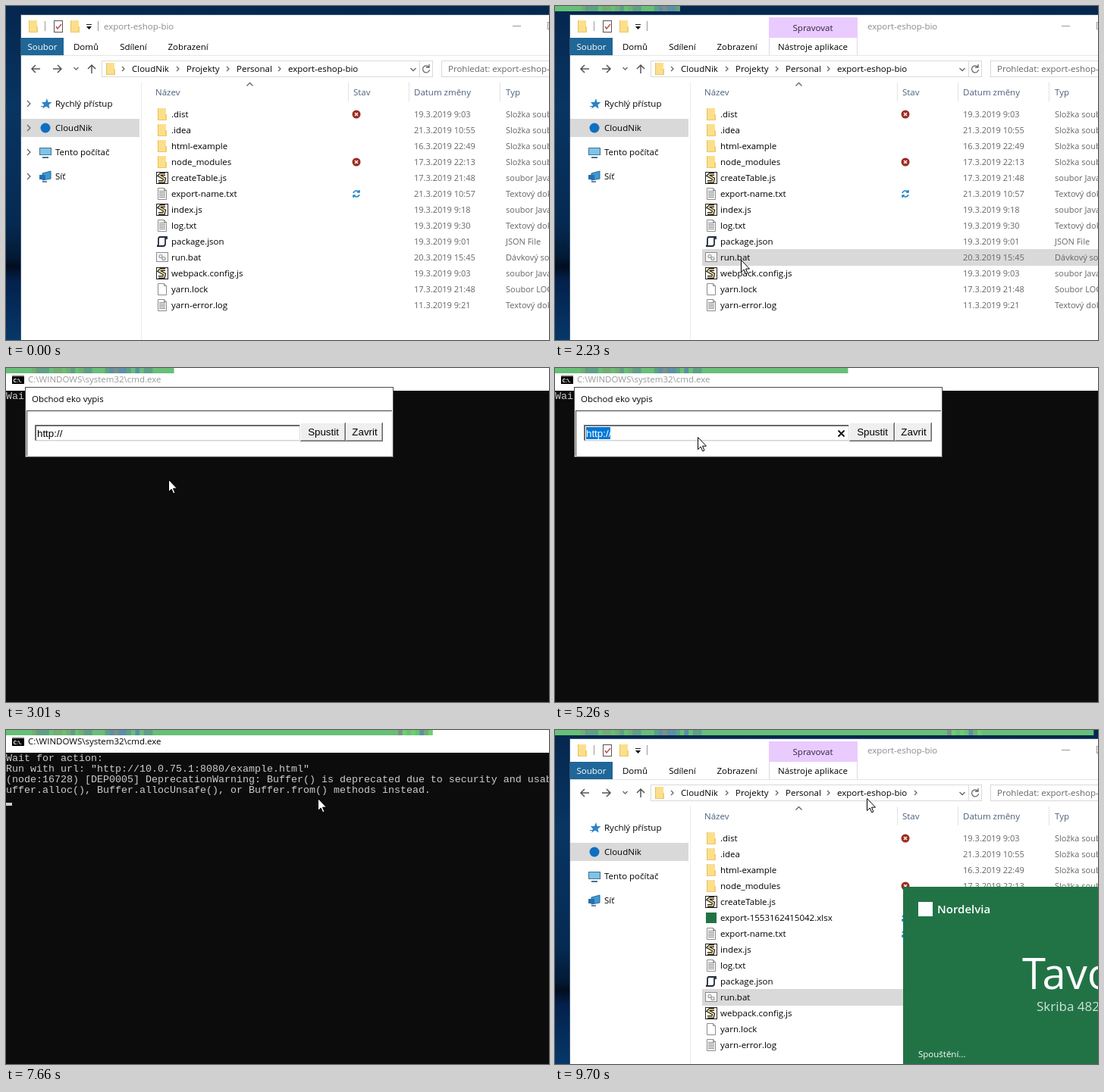
These frames come from a looping animation (716 by 441 pixels, 9.79 s). An HTML page:

```html
<!DOCTYPE html>
<html lang="cs">
<head>
<meta charset="utf-8">
<title>Export</title>
<style>
html, body { margin: 0; width: 100%; height: 100%; overflow: hidden; background: #0c0c0c; }
svg { display: block; }
text { font-family: "Open Sans", "Noto Sans", sans-serif; font-size: 11.5px; white-space: pre; }
.mono { font: 13.33px "Liberation Mono", monospace; fill: #ccc; }
.form { font: 13.33px "Liberation Sans", sans-serif; }
.mid { text-anchor: middle; }
.grey { fill: #666; }
.cell { fill: #666; font-size: 11px; }
.head { fill: #4c607a; }
.line { fill: none; stroke: #666; stroke-width: 1.3; }
</style>
</head>
<body>
<svg id="stage" width="716" height="441" viewBox="0 0 716 441"></svg>
<script>
const LOOP = 9790, FRAMES = 126, STEP = 77.6, ROW = 21, FIRST = 143;

const rect = (x, y, w, h, fill, more = '') =>
  `<rect x="${x}" y="${y}" width="${w}" height="${h}" fill="${fill}" ${more}/>`;
const path = (d, more = 'class="line"') => `<path d="${d}" ${more}/>`;
const text = (x, y, s, cls = '', more = '') => `<text x="${x}" y="${y}" class="${cls}" ${more}>${s}</text>`;
const group = (id, body, more = '') => `<g id="${id}" ${more}>${body}</g>`;
const chevron = (x, y, size = 3) => path(`M${x} ${y - size}l${size} ${size}l${-size} ${size}`);

// Icons: x is the left edge, y the vertical centre.
const icons = {
  folder: (x, y) => rect(x + 2, y - 8, 11, 16, '#fbdf8c') + rect(x + 12, y, 2, 8, '#f3cf6c') +
    rect(x + 2, y - 8, 1, 16, '#e9c25c') + rect(x + 3, y + 7, 10, 1, '#eec965'),
  page: (x, y) => path(`M${x + 2.5} ${y - 7.5}h8l3 3v12h-11z`, 'fill="#fff" stroke="#8b8b8b"') +
    path(`M${x + 10.5} ${y - 7.5}v3h3`, 'fill="none" stroke="#8b8b8b"'),
  note: (x, y) => icons.page(x, y) +
    path([-4, -2, 0, 2, 4].map(d => `M${x + 4} ${y + d + .5}h8`).join(''), 'stroke="#8b8b8b"'),
  script: (x, y) => {
    const scroll = `M${x + 12} ${y - 5}h-6l-2 2l7 4l-1 4h-7`;
    return rect(x + .5, y - 7.5, 15, 15, '#fff', 'stroke="#222"') +
      path(scroll, 'fill="none" stroke="#222" stroke-width="4"') +
      path(scroll, 'fill="none" stroke="#f3dc96" stroke-width="1.7"');
  },
  json: (x, y) => path(`M${x + 14} ${y - 3}v-3h-9q-2 0-2 3v6q0 3-2 3h8q3 0 3-3v-9`,
    'fill="#fff" stroke="#222c3c" stroke-width="1.8"'),
  batch: (x, y) => rect(x + .5, y - 6.5, 15, 12, '#f7f7f7', 'stroke="#8a8a8a"') +
    `<g fill="none" stroke="#999" stroke-width="1.2"><circle cx="${x + 6}" cy="${y - 1.5}" r="2"/>` +
    `<circle cx="${x + 10}" cy="${y + 1.5}" r="2"/></g>`,
  sheet: (x, y) => rect(x + 1, y - 7, 14, 14, '#217346'),
  failed: (x, y) => `<circle cx="${x}" cy="${y}" r="5.5" fill="#9c2b20"/>` +
    path(`M${x - 2} ${y - 2}l4 4m0-4l-4 4`, 'stroke="#fff" stroke-width="1.4"'),
  sync: (x, y) => path(`M${x - 4} ${y - 1}q1-3 4-3t4 2m0-3v3h-3M${x + 4} ${y + 1}q-1 3-4 3t-4-2m0 3v-3h3`,
    'fill="none" stroke="#1c86c8" stroke-width="1.5"'),
};

const FILES = [
  ['folder', '.dist', '19.3.2019 9:03', 'Složka souborů', 'failed'],
  ['folder', '.idea', '21.3.2019 10:55', 'Složka souborů'],
  ['folder', 'html-example', '16.3.2019 22:49', 'Složka souborů'],
  ['folder', 'node_modules', '17.3.2019 22:13', 'Složka souborů', 'failed'],
  ['script', 'createTable.js', '17.3.2019 21:48', 'soubor JavaScript'],
  ['note', 'export-name.txt', '21.3.2019 10:57', 'Textový dokument', 'sync'],
  ['script', 'index.js', '19.3.2019 9:18', 'soubor JavaScript'],
  ['note', 'log.txt', '19.3.2019 9:30', 'Textový dokument'],
  ['json', 'package.json', '19.3.2019 9:01', 'JSON File'],
  ['batch', 'run.bat', '20.3.2019 15:45', 'Dávkový soubor'],
  ['script', 'webpack.config.js', '19.3.2019 9:03', 'soubor JavaScript'],
  ['page', 'yarn.lock', '17.3.2019 21:48', 'Soubor LOCK'],
  ['note', 'yarn-error.log', '11.3.2019 9:21', 'Textový dokument'],
];
const SHEET = ['sheet', 'export-1553162415042.xlsx', '21.3.2019 10:57', 'List sešitu', 'sync'];
const SPLIT = 5, BATCH = 9;

const rowY = i => FIRST + i * ROW;
const rowBox = (id, i) => rect(194, rowY(i) - 11, 522, ROW + 1, '#e5f3ff', `id="${id}"`);
function row([icon, name, date, type, state], i) {
  const y = rowY(i);
  return icons[icon](198, y) + text(218, y + 4, name) + (state ? icons[state](462, y) : '') +
    text(538, y + 4, date, 'cell') + text(659, y + 4, type, 'cell');
}

function desktop() {
  const stops = [[0, '#05264e'], [.3, '#083562'], [.65, '#052a52'], [.75, '#031a36'], [.78, '#020d1e'],
    [.82, '#03204a'], [1, '#06386a']];
  return `<linearGradient id="sky" x2="0" y2="1">` +
    stops.map(([o, c]) => `<stop offset="${o}" stop-color="${c}"/>`).join('') + '</linearGradient>' +
    rect(0, 0, 716, 441, 'url(#sky)');
}

function toolbar() {
  return rect(19.5, 11.5, 700, 433, '#fff', 'stroke="#3b5876"') + icons.folder(28, 27) + icons.folder(83, 27) +
    path('M51.5 20v13M121.5 20v13', 'stroke="#999"') +
    rect(63.5, 19.5, 11, 15, '#fff', 'stroke="#555"') +
    path('M66 27l2 3l5-6', 'fill="none" stroke="#c0504d" stroke-width="1.5"') +
    path('M106 24.5h7', 'stroke="#222"') + path('M106 27h7l-3.5 4z', '') +
    path('M668 26.5h11', 'stroke="#999"') + rect(714.5, 21.5, 9, 9, 'none', 'stroke="#999"') +
    path('M20 65.5h696', 'stroke="#e4e5e6"') +
    group('tab', rect(282, 15, 117, 27, '#e9cbff') +
      path('M282.5 42v23M398.5 42v23', 'stroke="#e0d6e8"') +
      text(340, 33, 'Spravovat', 'mid', 'fill="#33203f"') + text(340, 58, 'Nástroje aplikace', 'mid')) +
    text(129, 31, 'export-eshop-bio', '', 'id="caption" fill="#8c8c8c"') +
    rect(20, 42, 56, 23, '#1f6798') + text(48, 58, 'Soubor', 'mid', 'fill="#fff"') +
    text(105.5, 58, 'Domů', 'mid') + text(168, 58, 'Sdílení', 'mid') + text(240, 58, 'Zobrazení', 'mid');
}

function addressBar() {
  const crumbs = [[166, 'CloudNik'], [238, 'Projekty'], [304, 'Personal'], [372, 'export-eshop-bio']];
  return path('M45 83h-11m5-5l-5 5l5 5M62 83h11m-5-5l5 5l-5 5M113 89v-11m-5 5l5-5l5 5',
      'fill="none" stroke="#555" stroke-width="1.5"') + path('M89.5 81l3 3l3-3') +
    rect(126.5, 72.5, 436, 21, '#fff', 'stroke="#d9d9d9"') + icons.folder(130, 83) +
    crumbs.map(([x, s]) => chevron(x - 13, 83) + text(x, 87, s)).join('') +
    group('lastChevron', chevron(474, 83)) +
    path('M533.5 82l3.5 3.5l3.5-3.5') + path('M545.5 73v20', 'stroke="#d9d9d9"') +
    path('M557.5 80.5a4.5 4.5 0 1 0 1 3.5M558 77v4h-4') +
    rect(574.5, 72.5, 160, 21, '#fff', 'stroke="#d9d9d9"') +
    text(583, 87, 'Prohledat: export-eshop-bio', 'grey');
}

function navigation() {
  const labels = ['Rychlý přístup', 'CloudNik', 'Tento počítač', 'Síť'];
  const ys = labels.map((_, i) => 129 + 32 * i);
  return path('M178.5 100v341', 'stroke="#ececec"') + rect(20, 149, 156, 24, '#d9d9d9') +
    labels.map((s, i) => text(65, ys[i] + 4, s)).join('') +
    group('chevrons', ys.map(y => chevron(28, y, 4)).join('')) +
    path('M54 122l1.500 5h5l-4 3.500l1 5l-4.500-3l-5 3l2-5l-3-3.500h5z', 'fill="#2c83c7"') +
    path('M46 132.5h4', 'stroke="#2c83c7"') +
    '<circle cx="52" cy="161" r="6.5" fill="#0f6fc0"/>' +
    rect(44.5, 187.5, 15, 9, '#7cc4ea', 'stroke="#46718c"') + rect(48, 199, 8, 2, '#46718c') +
    path('M48 221l11-3v10l-11 2z', 'fill="#3e9ad6" stroke="#28678f"') +
    rect(44, 223, 8, 6, '#276fae') + rect(48, 231, 6, 2, '#66879b');
}

function fileList() {
  return path('M451.5 101v25M531.5 101v25M651.5 101v25', 'stroke="#e3e3e3"') +
    path('M317.5 105.5l4-4l4 4') +
    [[197, 'Název'], [458, 'Stav'], [538, 'Datum změny'], [659, 'Typ']].map(([x, s]) => text(x, 118, s, 'head')).join('') +
    rowBox('hover', 0) +
    FILES.slice(0, SPLIT).map(row).join('') + group('sheetRow', row(SHEET, SPLIT)) +
    group('tail', rowBox('chosen', BATCH) + FILES.slice(SPLIT).map((f, i) => row(f, i + SPLIT)).join(''));
}

function splash() {
  return rect(459, 207, 257, 234, '#217346') + rect(479, 227, 19, 19, '#fff') +
    text(504, 242, 'Nordelvia', '', 'fill="#fff" style="font-size:15px;font-weight:600"') +
    group('product', text(616, 342, 'Tavol', '', 'fill="#fff" style="font-size:56px"') +
      text(635, 371, 'Skriba 482', '', 'fill="#d3e3da" style="font-size:17px"')) +
    text(479, 432, 'Spouštění...', '', 'fill="#fff"');
}

function terminal() {
  const lines = ['Wait for action:', 'Run with url: "http://10.0.75.1:8080/example.html"',
    '(node:16728) [DEP0005] DeprecationWarning: Buffer() is deprecated due to security and usability',
    'uffer.alloc(), Buffer.allocUnsafe(), or Buffer.from() methods instead.'];
  return rect(0, 0, 716, 441, '#0c0c0c') + rect(0, 0, 716, 30, '#fff') +
    rect(8, 9, 16, 12, '#000') + rect(8, 9, 16, 2, '#b5b5b5') +
    text(9.5, 18.5, 'C:\\.', '', 'fill="#fff" style="font-size:7px;font-weight:700"') +
    text(29, 19, 'C:\\WINDOWS\\system32\\cmd.exe', '', 'id="cmdTitle"') +
    lines.map((s, i) => text(0, 41 + 14 * i, s, 'mono', `id="out${i}"`)).join('') +
    rect(0, 96, 8, 4, '#ccc', 'id="block"');
}

function button(x, w, label) {
  return rect(x, 72, w, 25, '#696969') + rect(x, 72, w - 1, 24, '#fff') +
    rect(x + 1, 73, w - 2, 23, '#a0a0a0') + rect(x + 1, 73, w - 3, 22, '#efefef') +
    text(x + w / 2 + .5, 89, label, 'form mid');
}

function dialog() {
  return rect(25.5, 25.5, 485, 92, '#fff', 'stroke="#4a4a4a"') + text(34, 45, 'Obchod eko vypis') +
    path('M27.5 116v-59.5h481.5', 'fill="none" stroke="#696969" stroke-width="1.5"') +
    path('M28 116.5h481v-58', 'fill="none" stroke="#dedede"') +
    rect(38, 75, 350, 21.5, '#dcdcdc') + rect(38, 75, 349, 20.5, '#696969') + rect(40, 77, 347, 18.5, '#fff') +
    rect(41, 78, 32, 16, '#0078d7', 'id="selection"') + text(41, 91, 'http://', 'form', 'id="url"') +
    path('M373.5 82.5l8 8m0-8l-8 8', 'id="clear" stroke="#111" stroke-width="1.8"') +
    button(388, 60, 'Spustit') + button(448, 49, 'Zavrit');
}

// Two busy stretches of the progress strip are speckled with muted tones.
function progress() {
  const tones = ['#67bf78', '#67bf78', '#5f9f86', '#7f8f86', '#5b8fa6', '#6dcf6c', '#74ad72'];
  const width = 716 / FRAMES;
  let s = rect(0, 0, 716, 7, '#67bf78');
  for (let i = 5; i < 99; i++) {
    if (i > 33 && i < 90) continue;
    const tone = tones[Math.floor(Math.abs(Math.sin(i * 12.9898) * 43758.5) % tones.length)];
    s += rect(i * width, 0, width + .2, 7, tone);
  }
  return `<clipPath id="done">${rect(0, 0, 0, 7, '#000', 'id="bar"')}</clipPath>` +
    `<g clip-path="url(#done)">${s}</g>`;
}

document.getElementById('stage').innerHTML =
  group('explorer', desktop() + toolbar() + addressBar() + navigation() + fileList() + group('splash', splash())) +
  group('terminal', terminal() + group('dialog', dialog())) +
  progress() +
  group('pointer', path('M.5 .5v16l3.7-3.5l2.5 5.8l2.3-1l-2.500-5.700h5z', 'fill="#fff" stroke="#000"'));

const $ = Object.fromEntries([...document.querySelectorAll('[id]')].map(e => [e.id, e]));
const show = (e, on) => e.setAttribute('visibility', on ? 'inherit' : 'hidden');
const ramp = (t, from, to) => Math.min(1, Math.max(0, (t - from) / (to - from)));
const ease = p => p * p * (3 - 2 * p);

// Pointer stops: time, x, y.
const STOPS = [[70, -14, 215], [680, 313, 252], [1050, 313, 252], [1700, 245, 335], [2300, 245, 335],
  [2950, 214, 147], [3080, 214, 147], [3450, 62, 84], [3620, 62, 84], [3960, 188, 91], [6120, 188, 91],
  [6640, 411, 90], [LOOP, 411, 90]];
function pointerAt(t) {
  const n = Math.max(1, STOPS.findIndex(s => s[0] >= t));
  const [a, b] = [STOPS[n - 1], STOPS[n]];
  const p = ease(ramp(t, a[0], b[0]));
  return [a[1] + (b[1] - a[1]) * p, a[2] + (b[2] - a[2]) * p].map(Math.round);
}

function render(time) {
  const frame = Math.min(FRAMES - 1, Math.floor((time + 40) / STEP));
  const t = frame * STEP;
  const [x, y] = pointerAt(t);
  $.bar.setAttribute('width', 716 * frame / FRAMES);
  $.pointer.setAttribute('transform', `translate(${x} ${y})`);

  const chosen = t > 1820, exported = t > 8350;
  const inTerminal = t > 2480 && t < 8350;
  show($.explorer, !inTerminal);
  show($.terminal, inTerminal);

  $.chevrons.setAttribute('opacity', 1 - .9 * ramp(t, 200, 760) - .1 * ramp(t, 760, 900));
  show($.tab, chosen);
  $.caption.setAttribute('x', chosen ? 412 : 129);
  show($.chosen, chosen);
  $.chosen.setAttribute('fill', t > 2140 ? '#d9d9d9' : '#cce8ff');
  const over = Math.floor((y - FIRST + ROW / 2) / ROW);
  show($.hover, !chosen && x > 194 && over >= 0 && over < FILES.length);
  $.hover.setAttribute('y', rowY(over) - 11);
  show($.sheetRow, exported);
  $.tail.setAttribute('transform', `translate(0 ${exported ? ROW : 0})`);
  show($.lastChevron, t > 9140);
  show($.splash, t > 8900);
  $.product.setAttribute('opacity', ramp(t, 9080, 9400));

  const open = t > 2760 && t < 7100;
  show($.dialog, open);
  $.dialog.setAttribute('opacity', ramp(t, 2700, 2900) * (1 - ramp(t, 6950, 7100)));
  $.cmdTitle.setAttribute('fill', t > 2760 && t < 6950 ? '#999' : '#000');
  const selected = t > 4300 && t < 5600;
  show($.selection, selected);
  $.url.setAttribute('fill', selected ? '#fff' : '#000');
  $.url.textContent = t > 5600 ? 'http://10.0.75.1:8080/example.html' : 'http://';
  show($.clear, t > 3560);

  const printed = t > 7420 ? 4 : t > 7150 ? 2 : 1;
  for (let i = 0; i < 4; i++) show($['out' + i], i < printed);
  $.block.setAttribute('y', printed === 4 ? 96 : 40 + 14 * printed);
  show($.block, t > 7000 && Math.floor((t - 7400) / 530) % 2 === 0);
}

const start = performance.now();
function tick() {
  render((performance.now() - start) % LOOP);
  requestAnimationFrame(tick);
}
tick();
</script>
</body>
</html>
```
